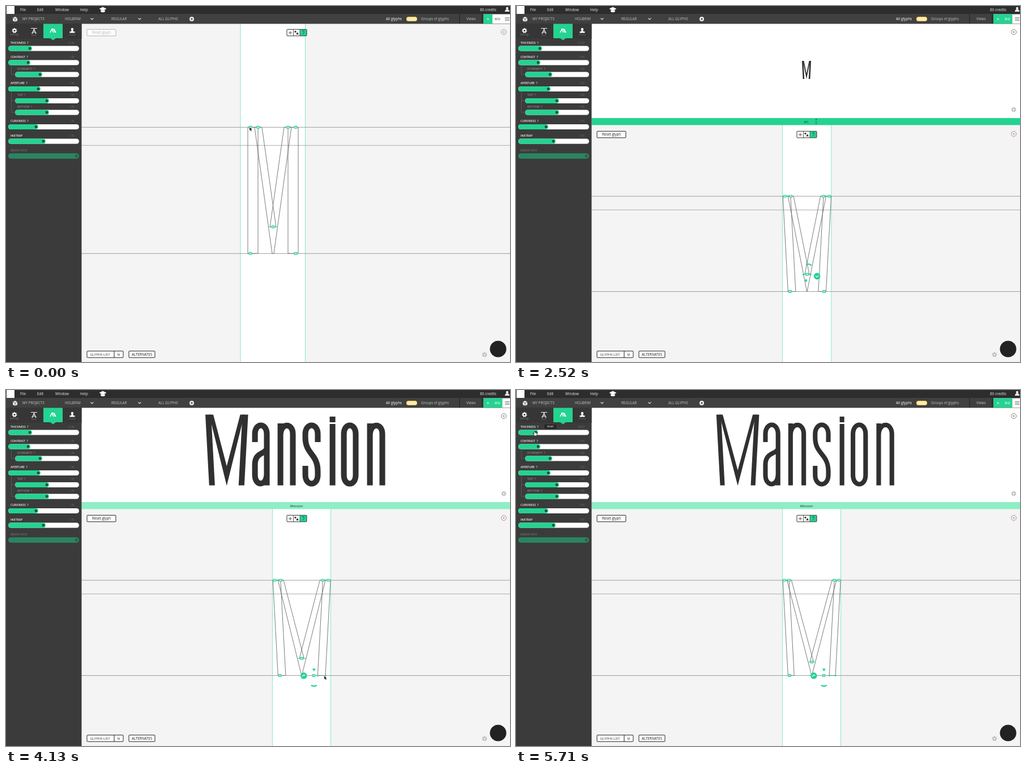
These frames come from a looping animation (890 px wide and 629 px high, 5.81 s). An HTML page:

```html
<!DOCTYPE html>
<html lang="en">
<head>
<meta charset="utf-8">
<title>Glyph editor</title>
<style>
html, body { margin: 0; width: 100%; height: 100%; overflow: hidden; background: #f4f4f4; }
svg { display: block; width: 100vw; height: 100vh; font-family: "Open Sans", "Noto Sans", sans-serif; }
</style>
</head>
<body>
<svg id="stage" viewBox="0 0 890 629" preserveAspectRatio="none">
  <g id="work"></g><g id="chrome"></g><g id="live"></g>
</svg>
<script>
const LOOP = 5810, GREEN = '#24d391', DARK = '#3b3b3b';
const SPLIT = 2200, TYPING = 2580, KEY_GAP = 62, BLUR = 3740;
const $ = id => document.getElementById(id);

// Eased value at time t from [time, value] stops
function at(t, stops) {
  if (t <= stops[0][0]) return stops[0][1];
  for (let i = 1; i < stops.length; i++) {
    const [t0, a] = stops[i - 1], [t1, b] = stops[i];
    if (t < t1) {
      const u = (t - t0) / (t1 - t0);
      return a + (b - a) * u * u * (3 - 2 * u);
    }
  }
  return stops[stops.length - 1][1];
}

const rect = (x, y, w, h, fill, more = '') => `<rect x="${x}" y="${y}" width="${w}" height="${h}" fill="${fill}" ${more}/>`;
const circle = (x, y, r, fill, more = '') => `<circle cx="${x}" cy="${y}" r="${r}" fill="${fill}" ${more}/>`;
const path = (d, stroke, width = 1, fill = 'none', more = '') =>
  `<path d="${d}" stroke="${stroke}" stroke-width="${width}" fill="${fill}" ${more}/>`;
const text = (x, y, s, size, fill, more = '') => `<text x="${x}" y="${y}" font-size="${size}" fill="${fill}" ${more}>${s}</text>`;
const poly = points => 'M' + points.map(p => p.join()).join('L') + 'Z';

function button(x, y, w, label, color = '#222') {
  return rect(x, y, w, 11.5, '#fdfdfd', `rx="1" stroke="${color}" stroke-width="1"`) +
    text(x + w / 2, y + 8, label, 6.2, color, 'text-anchor="middle"');
}

function gear(x, y, color, r = 3) {
  return circle(x, y, r, 'none', `stroke="${color}" stroke-width="1.8"`) +
    circle(x, y, r + 1.4, 'none', `stroke="${color}" stroke-width="1.2" stroke-dasharray="1.7 1.7"`);
}

const closeMark = (x, y, color) => circle(x, y, 4.5, 'none', `stroke="${color}" stroke-width=".9"`) +
  path(`M${x - 1.5},${y - 1.5}l3,3m0,-3l-3,3`, color, .9);

function slider(x, y, knob, on = true) {
  const fill = on ? GREEN : '#2a8562';
  return rect(x, y - 4.5, 129 - x, 9, on ? '#fff' : fill, 'rx="4.5"') +
    rect(x, y - 4.5, knob + 4 - x, 9, fill, 'rx="4.5"') +
    circle(knob, y, 2.4, on ? '#1d4b39' : '#225d48');
}

function label(x, y, name, value, color) {
  return text(x, y, name + ' &#160;' + (name === 'INKTRAP' || name === 'BREAK PATH' ? '' : '?'), 5, color, 'font-weight="600"') +
    text(121, y, value, 4.6, '#6b6b6b', 'text-anchor="end"');
}

function drawChrome() {
  const menu = [[25, 'File'], [55, 'Edit'], [87, 'Window'], [131, 'Help'], [837, '80 credits']];
  const bar = [[29, 'MY PROJECTS'], [104, 'HOLBRIM'], [186, 'REGULAR'], [269, 'ALL GLYPHS'], [733, 'Groups of glyphs'], [813, 'Views']];
  const rows = [
    ['CONTRAST', 4, 100, 39], ['EXTREMITY', 16, 121, 60], ['APERTURE', 4, 146.5, 57], ['TOP', 16, 167.5, 72],
    ['BOTTOM', 16, 188, 72], ['CURVINESS', 4, 213.5, 53], ['INKTRAP', 4, 239, 66], ['BREAK PATH', 4, 265, 124]
  ];
  let s = rect(0, 0, 890, 14, '#2d2d2d') + rect(0, 14, 890, 17.5, '#404040') + rect(0, 31, 133.5, 598, DARK) +
    rect(0, 31, 133.5, 27, '#363636') + rect(1, 0, 14, 14, '#fff');
  for (const [x, name] of menu) s += text(x, 8.5, name, 6.4, '#eee');
  for (const [x, name] of bar) s += text(x, 25.3, name, 6.2, '#c4c4c4');
  s += text(671, 25.3, 'All glyphs', 6.4, '#fff');
  for (const x of [152, 236]) s += path(`M${x - 2.5},21.5l2.5,2.5l2.5,-2.5`, '#ddd', 1.1);
  s += path('M165,5l6,-3l6,3l-6,3ZM167.5,7.5v2.5q3.5,2 7,0v-2.5', '#fff', .6, '#fff');
  s += circle(885, 4, 2.2, '#eee') + path('M881,10q0,-4 4,-4t4,4Z', 'none', 0, '#eee');
  s += path('M16,19l4,2v5l-4,2l-4,-2v-5Z', 'none', 0, '#eee') + path('M12,21l4,2l4,-2M16,23v5', DARK, .7);
  s += circle(328, 23, 4, '#eee') + path('M326,23h4M328,21v4', DARK, 1.1);
  s += rect(707.5, 19.5, 18, 7, '#ffe9b0', 'rx="3.5" stroke="#ffcf5e" stroke-width="1.2"');
  s += path('M801,14v17M841,14v17', '#242424', 1.2);

  s += gear(15, 43.5, '#fff', 2.5) + text(15, 52, 'Settings', 4.4, '#777', 'text-anchor="middle"');
  s += path('M44,39.5h11M45,48h3M51,48h3M46.5,48l3,-7l3,7M48,46h3', '#fff', 1.1) + text(49, 52.5, 'Serif', 4, '#777', 'text-anchor="middle"');
  s += rect(66, 31.5, 34, 25.5, GREEN) + path('M78,57l5,3.5l5,-3.5Z', 'none', 0, GREEN);
  s += path('M78,47l3,-6l3,6M81,41l4,0l3,6M84,41l3,6', '#fff', 1.6);
  s += circle(117, 41, 2.2, '#fff') + path('M115.8,42h2.4l.6,3h2.7v2.5h-9v-2.5h2.7Z', 'none', 0, '#fff') +
    text(117, 52, 'Stamp', 4, '#777', 'text-anchor="middle"');

  s += path('M9.5,107v14h6M9.5,152v36h6M9.5,167.5h6', '#777', .8, 'none', 'stroke-dasharray="1.5 1"');
  for (const [name, x, y, knob] of rows) {
    const off = name === 'BREAK PATH';
    s += label(x + 4, y - 8.4, name, off ? '–' : '1.00', off ? '#6d6d6d' : x > 4 ? '#858585' : '#eee') + slider(x, y, knob, !off);
  }
  $('chrome').innerHTML = s;
}

// Control points of the M in glyph units
function shapeM(p) {
  const { thick: T, tiltL, tiltR, right, crotch } = p;
  const top = 214, base = 437, left = 427, mid = (left + right) / 2;
  const tl = left - tiltL, tr = right + tiltR;
  const outL = tl + T * 2 / 3, outR = tr - T * 2 / 3, inL = outL + .72 * T, inR = outR - .72 * T;
  const nub = 1.5 - (tiltL + tiltR) * .05, u = (crotch - top) / (base - top);
  const notch = top + (crotch - top) * (mid - inL) / (mid + .3 * T - inL);
  return {
    mid, tl, tr, barL: outL + (mid - nub - outL) * u, barR: outR + (mid + nub - outR) * u,
    stems: [
      [[tl, top], [tl + T, top], [left + T, base], [left, base]],
      [[tr - T, top], [tr, top], [right, base], [right - T, base]]
    ],
    vee: [[outL, top], [inL, top], [mid + .3 * T, crotch], [mid - .3 * T, crotch], [inR, top], [outR, top], [mid + nub, base], [mid - nub, base]],
    solidVee: [[outL, top], [inL, top], [mid, notch], [inR, top], [outR, top], [mid + nub, base], [mid - nub, base]]
  };
}

// Lower-case letters as strokes: centre lines a and b, control heights t (top) and f (foot)
const letterPath = {
  a: (a, b, t, f) => `M${a},92V78C${a},${t} ${b},${t} ${b},78V168.5M${b},104C${b - 4},114 ${a},110 ${a},132V150C${a},${f} ${b},${f} ${b},148`,
  n: (a, b, t) => `M${a},168.5V59M${a},80C${a},${t} ${b},${t} ${b},78V168.5`,
  s: (a, b, t, f) => `M${b},92V78C${b},${t} ${a},${t} ${a},78V84C${a},114 ${b},112 ${b},144V150C${b},${f} ${a},${f} ${a},150V134`,
  i: a => `M${a},168.5V60M${a},57V47`,
  o: (a, b, t, f) => `M${a},78C${a},${t} ${b},${t} ${b},78V150C${b},${f} ${a},${f} ${a},150Z`
};

function drawWord(m, thick, count, zoom) {
  const k = .56, w = thick * k, thin = .17 * (18 - thick);
  const widths = { a: 31, n: 32, s: 32, i: 10, o: 31 };
  const gaps = [7, 14, 12, 16, 10, 15];
  // Control heights that put the outer curve edges at 57.5 and 170.5
  const head = (57.5 + w / 2 - 78 / 4) / .75, foot = (170.5 - w / 2 - 150 / 4) / .75;
  let x = (m.tr - m.tl) * k, strokes = '';
  [...'ansion'].slice(0, count - 1).forEach((c, i) => {
    const a = x + gaps[i], b = a + widths[c] - thin;
    strokes += letterPath[c](a + w / 2, b - w / 2, head, foot);
    x = b;
  });
  const big = pts => poly(pts.map(([px, py]) => [(px - m.tl) * k, 168.5 + (py - 437) * k]));
  const solid = [...m.stems, m.solidVee].map(big).map(d => path(d, 'none', 0, '#303030')).join('');
  const grown = (zoom - .256) / .744;
  return `<g transform="translate(${513 - 2.2 * grown} ${113 - 7 * grown}) scale(${zoom}) translate(${-x / 2} -106)">` +
    solid + path(strokes, '#303030', w) + '</g>';
}

const handle = (x, y) => rect(x - 2.7, y - 1.9, 5.4, 3.8, '#a9edd0', `rx="1.2" stroke="${GREEN}" stroke-width="1.1"`);

const widget = (x, y, turn) => `<g transform="translate(${x} ${y}) rotate(${turn})">` +
  circle(18, 0, 5.8, GREEN) + path('M15.5,0l2,1.5l3.5,-3', '#fff', 1.2) +
  path('M-5,-17q5,-3 10,0', GREEN, 2.2) + path('M-3,12.5h6l-3,-5Z', 'none', 0, GREEN) + '</g>';

function tools(y) {
  return rect(496, y, 35, 11.5, '#fff', 'rx="1"') + rect(519, y, 12, 11.5, GREEN) +
    rect(496, y, 35, 11.5, 'none', 'rx="1" stroke="#333"') +
    path(`M507.5,${y}v11.5M519,${y}v11.5M499,${y + 6}h6M502,${y + 3}v6`, '#444', .9) +
    circle(511, y + 4, 1.6, '#333') + path(`M512,${y + 9}h5l-2.5,-4Z`, 'none', 0, '#333') +
    path(`M523,${y + 3}l3,-1v4l-2,3`, '#176f4e', 1);
}

function drawViewIcons(split) {
  const link = split ? '#d4f7e8' : '#777';
  return rect(843, 14.5, 47, 16.5, '#fff') + rect(843, 14.5, split ? 33.5 : 16, 16.5, GREEN) +
    text(851, 25, 'A', 5.5, '#fff', 'text-anchor="middle" font-weight="600"') +
    path('M866.5,21.5h-1.5q-1.5,0 -1.5,1.5t1.5,1.5h1.5M869,21.5h1.5q1.5,0 1.5,1.5t-1.5,1.5h-1.5M865.5,23h4', link, 1) +
    path('M881,20.5h8M881,23h8M881,25.5h8', '#777', 1);
}

function drawCursor(t) {
  const x = at(t, [[150, 430], [560, 418], [760, 511], [1150, 523], [1350, 470], [1850, 470], [2180, 867], [2250, 867], [2450, 530], [3130, 530], [3380, 544], [3610, 539], [4150, 562], [4400, 41], [4620, 31], [5000, 26], [5240, 27], [5710, 33]]);
  const y = at(t, [[560, 214], [1150, 214], [1350, 390], [1740, 396], [1850, 396], [2180, 23], [2250, 23], [2450, 204], [3130, 204], [3380, 505], [4150, 505], [4400, 75]]);
  let shape;
  if (t > 1400 && t < 1860) shape = path('M-4,0h8M0,-4v8', '#fff', 3) + path('M-4,0h8M0,-4v8', '#222', 1.6);
  else if (t > 2420 && t < 3130) shape = path('M-1,-4h2M0,-4v8M-1,4h2', '#245c45', 1.2, 'none', 'stroke-dasharray="2 1.5"');
  else if (t > 4350) shape = path('M-1,-1.5v4l-2,-1l2.5,4.5h4l1,-4.5l-3.5,-1v-2Z', '#222', .8, '#fff');
  else shape = path('M0,0v6.5l1.6,-1.4l1.2,2.4l1.3,-.6l-1.2,-2.3h2.1Z', '#fff', .4, '#111');
  return `<g transform="translate(${x} ${y})">${shape}</g>`;
}

function render(t) {
  const split = t >= SPLIT;
  const knob = at(t, [[4420, 42], [4620, 33], [5000, 28], [5240, 29], [5710, 35]]);
  const thick = 18 - (42 - knob) * .5;
  const p = {
    thick,
    tiltL: at(t, [[150, 0], [560, 12]]),
    tiltR: at(t, [[760, 0], [1150, 12]]),
    right: at(t, [[3380, 516], [3610, 510], [4150, 538]]),
    crotch: at(t, [[1350, 390], [1740, 397]]) + 2.4 * (18 - thick)
  };
  const m = shapeM(p), scale = split ? .755 : 1;
  const X = x => split ? 470.5 + (x - 414) * scale : x;
  const Y = y => split ? 504.5 + (y - 437) * scale : y + .3;
  const top = split ? 210 : 31, shift = split ? 180 : 0;
  const edge = X(p.right + 12.5);

  let s = rect(133.5, top, 756.5, 629 - top, '#f4f4f4') + rect(X(414), top, edge - X(414), 629 - top, '#fff');
  s += path(`M${X(414)},${top}V629M${edge},${top}V629`, '#98e9cb', 1.2);
  s += [214, 246, 437].map(y => path(`M133.5,${Y(y)}H890`, y === 246 ? '#aaa1a4' : '#949494', .9)).join('');
  const outline = pts => path(poly(pts.map(([x, y]) => [X(x), Y(y)])), '#6b6b6b', .9);
  s += [...m.stems, m.vee].map(outline).join('');
  s += path(`M${X(m.barL)},${Y(p.crotch)}H${X(m.barR)}`, GREEN, .9);

  const inset = thick / 4, dragged = t >= 3380;
  for (const x of [m.tl + inset, m.tl + thick, m.tr - thick, m.tr - inset]) s += handle(X(x), Y(214));
  s += handle(X(427 + inset), Y(437)) + handle(dragged ? 543.5 : X(p.right - inset), Y(437)) + handle(X(m.mid), Y(p.crotch));
  const dot = (x, y) => circle(X(x), Y(y), 1.6, GREEN);
  if (dragged) {
    s += widget(543.8, Y(437) + .3, 180) + dot(p.right, 437) + dot(p.right - thick, 437);
  } else if (t >= 1350) {
    s += widget(X(471.5), Y(397), 10) + dot(m.barL, p.crotch) + dot(m.barR, p.crotch);
  } else if (t >= 760) {
    s += widget(X(511), Y(214), 3);
  } else if (t >= 180) {
    s += widget(X(431), Y(214), -3);
  }

  s += button(143, 41.3 + shift, 51, 'Reset glyph', t < 200 ? '#b5b5b5' : '#222') + tools(41.3 + shift);
  s += closeMark(879, 46 + shift, split || t < 200 ? '#b0868c' : '#777') + gear(845, 616, '#bdbdbd', 2.5);
  s += button(143, 609.7, 64, '') + text(148.5, 617.7, 'GLYPHS LIST', 6, '#333') + path('M191,609.7v11.5', '#222') +
    text(199, 617.5, 'M', 5.5, '#333', 'text-anchor="middle"') + button(217, 609.7, 46, 'ALTERNATES');
  s += circle(869, 606, 14.5, '#222');

  if (split) {
    const count = Math.max(1, Math.min(7, 2 + Math.floor((t - TYPING) / KEY_GAP)));
    const zoom = at(t, [[2940, .256], [3060, 1]]);
    const caret = t < 3130 ? '|' : '';
    s += rect(133.5, 31, 756.5, 167.5, '#fff') + drawWord(m, thick, count, zoom);
    s += closeMark(879, 46, '#777') + gear(879, 183, '#bdbdbd', 2.5);
    s += rect(133.5, 198, 756.5, 12.4, t < BLUR ? GREEN : '#8eeec6') +
      text(513, 206.5, 'Mansion'.slice(0, count) + caret, 6, '#143b2b', 'text-anchor="middle" font-style="italic"');
  }
  $('work').innerHTML = s;

  const reset = t >= 4420 ? rect(50, 61, 21, 7.5, '#262626', 'rx="1"') +
    text(60.5, 66.3, 'reset', 5, '#eee', 'text-anchor="middle"') : '';
  $('live').innerHTML = drawViewIcons(split) + label(8, 66.5, 'THICKNESS', (thick * 4).toFixed(2), '#eee') + reset +
    slider(4, 75, knob) + drawCursor(t);
}

drawChrome();
render(0);
let start;
function tick(now) {
  start ??= now;
  render((now - start) % LOOP);
  requestAnimationFrame(tick);
}
requestAnimationFrame(tick);
</script>
</body>
</html>
```
